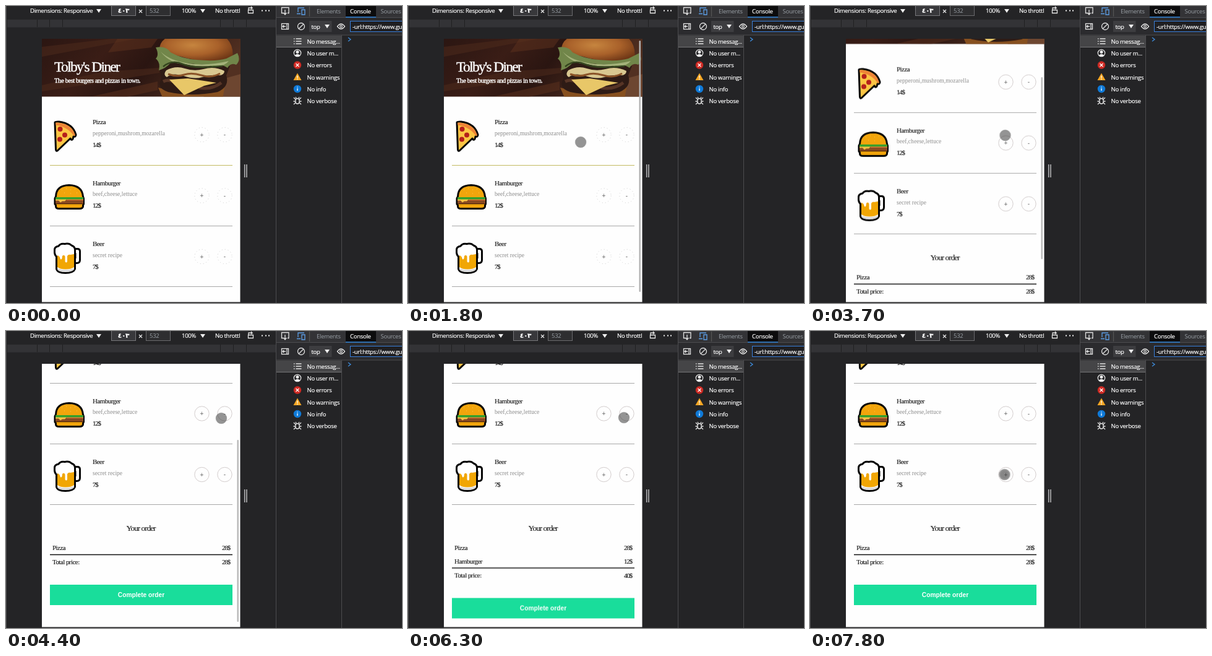
These frames come from a looping animation (640x480 px, 8 s). An HTML page:

```html
<!DOCTYPE html>
<html lang="en">
<head>
<meta charset="utf-8">
<title>Diner menu</title>
<style>
html, body { margin: 0; width: 100%; height: 100%; overflow: hidden; background: #242426; }
svg { display: block; width: 640px; height: 480px; }

.ui { font: 9.5px "Open Sans", "Noto Sans", sans-serif; letter-spacing: -.28px; }
.ui text { fill: #fff; stroke: #fff; stroke-width: .2; }
.ui .dim { fill: #9aa0a6; stroke: none; }
.line { fill: none; stroke: #e4e4e4; stroke-width: 1.3; }

.menu { font: 11px "Liberation Serif", "Noto Serif", serif; letter-spacing: -.55px; fill: #1c1c1c; stroke: #1c1c1c; stroke-width: .15; }
.menu .title { font-size: 23.5px; letter-spacing: -1.7px; stroke-width: .4; }
.menu .sub { letter-spacing: -.6px; stroke-width: .35; }
.white { fill: #fff; stroke: #fff; }
.menu .desc { font-size: 9.5px; letter-spacing: .03px; fill: #8c8c8c; stroke: none; }
.menu .price { letter-spacing: -1.2px; }
.menu .head { font-size: 13px; letter-spacing: -.9px; }
.end { text-anchor: end; }
.mid { text-anchor: middle; }
.rule { stroke: #a8a8a8; stroke-width: 1; }
.sign { font: 10px "Liberation Sans", Arial, sans-serif; letter-spacing: 0; fill: #666; stroke: none; text-anchor: middle; }
.cta { font: bold 10.2px "Liberation Sans", Arial, sans-serif; letter-spacing: 0; fill: #fff; stroke: none; text-anchor: middle; }
.ink { stroke: #050505; stroke-width: 3; stroke-linejoin: round; stroke-linecap: round; }

.page, .cursor, .thumb1, .thumb2 { animation: 8s linear infinite; }
.seen, .press, .extra, .plain, .lower, .rings, .first { animation: 8s step-end infinite; }

.page { animation-name: scroll; }
@keyframes scroll {
  0%, 3.75% { transform: translateY(0); }
  6.25%, 16.25% { transform: translateY(-8px); }
  20%, 45% { transform: translateY(0); animation-timing-function: ease-out; }
  48.75%, 100% { transform: translateY(-173px); }
}
.cursor { animation-name: move; }
@keyframes move {
  0%, 3.75% { transform: translate(214px, 300px); }
  7.5% { transform: translate(200px, 215px); }
  12.5%, 16.25% { transform: translate(196px, 207.5px); }
  20%, 21.25% { transform: translate(225px, 222px); }
  22.5% { transform: translate(279px, 220px); }
  27.5%, 36.25% { transform: translate(318px, 208px); }
  37.5%, 51.25% { transform: translate(315.5px, 209px); }
  55% { transform: translate(348px, 141px); }
  58.75%, 67.5% { transform: translate(317px, 133px); }
  76.25%, 88.75% { transform: translate(349px, 140px); }
  93.75%, 100% { transform: translate(314.5px, 232px); }
}
.seen { animation-name: seen; }
@keyframes seen { 0% { opacity: 0; } 3.75%, 100% { opacity: 1; } }
.press { animation-name: press; }
@keyframes press {
  0%, 37.5%, 45%, 62.5%, 83.75% { opacity: 0; }
  36.25%, 42.5%, 61.25%, 81.25%, 96.25%, 100% { opacity: 1; }
}
.thumb1 { animation-name: thumb1; }
@keyframes thumb1 {
  0%, 3.74% { opacity: 0; transform: translateY(0); }
  3.75% { opacity: 1; transform: translateY(0); }
  6.25%, 16.25% { opacity: 1; transform: translateY(8px); }
  20%, 25% { opacity: 1; transform: translateY(0); }
  27.5%, 100% { opacity: 0; transform: translateY(0); }
}
.thumb2 { animation-name: thumb2; }
@keyframes thumb2 {
  0%, 44.99% { opacity: 0; transform: translateY(0); }
  45% { opacity: 1; transform: translateY(0); animation-timing-function: ease-out; }
  48.75%, 56.25% { opacity: 1; transform: translateY(120px); }
  58.75%, 100% { opacity: 0; transform: translateY(120px); }
}
.extra { animation-name: extra; }
@keyframes extra { 0%, 86.25%, 100% { opacity: 0; } 65% { opacity: 1; } }
.plain { animation-name: plain; }
@keyframes plain { 0%, 86.25%, 100% { opacity: 1; } 65% { opacity: 0; } }
.lower { animation-name: lower; }
@keyframes lower { 0%, 86.25%, 100% { transform: translateY(0); } 65% { transform: translateY(21.5px); } }
.rings { fill: none; stroke-width: 1; animation-name: rings; }
@keyframes rings {
  0% { stroke: #c9c9c9; stroke-dasharray: 1 4; }
  45%, 100% { stroke: #d2cccc; stroke-dasharray: none; }
}
.first { animation-name: first; }
@keyframes first { 0% { stroke: #c3ba62; } 45%, 100% { stroke: #a8a8a8; } }
</style>
</head>
<body>
<svg viewBox="0 0 640 480">
  <defs>
    <clipPath id="view"><rect x="58" y="53" width="320.500" height="425.500"/></clipPath>
    <clipPath id="banner"><rect x="58" y="53" width="321" height="93.500"/></clipPath>
    <linearGradient id="wood" x2="1" y2=".25">
      <stop offset="0" stop-color="#2b1612"/><stop offset=".35" stop-color="#3a1d16"/>
      <stop offset=".6" stop-color="#2a1511"/><stop offset="1" stop-color="#523021"/>
    </linearGradient>
    <radialGradient id="bun" cx=".45" cy=".4" r=".65">
      <stop offset="0" stop-color="#c6853f"/><stop offset=".55" stop-color="#a9612a"/><stop offset="1" stop-color="#6f3716"/>
    </radialGradient>
    <path id="down" d="M0 0h8l-4 6z" fill="#eee"/>
  </defs>

  <!-- device toolbar -->
  <rect width="640" height="480" fill="#242426"/>
  <path d="M.5 0V480" stroke="#4a4a4c"/>
  <rect x="2" y="22" width="434" height="12.500" fill="#333336"/>
  <path d="M50.500 22v12M70.500 22v12M91.500 22v12M346.500 22v12M367.500 22v12M388.500 22v12" stroke="#1f1f21"/>
  <g class="ui">
    <text x="39" y="11">Dimensions: Responsive</text>
    <use href="#down" x="146" y="5"/>
    <rect x="170.500" y="-2" width="39" height="17.500" fill="#38383b" stroke="#77777a"/>
    <text class="mid" x="190" y="11" style="font:bold 10.5px 'DejaVu Sans',sans-serif">٤٠٣</text>
    <path d="M215 6l5 5m0-5l-5 5" class="line"/>
    <rect x="226.500" y="-2" width="39" height="17.500" fill="#2e2e30" stroke="#6a6a6d"/>
    <text class="dim" x="232" y="11">532</text>
    <text x="284" y="11">100%</text>
    <use href="#down" x="314" y="5"/>
    <text x="338" y="11">No throttl</text>
    <path d="M392 6V3h6l-2-2m2 2l-2 2M391.500 6.500h8v5h-8z" class="line"/>
    <path d="M413 7.500h2m4 0h2m3 0h2" stroke="#eee" stroke-width="2"/>
  </g>
  <path d="M385.700 256v21m3.300-21v21" stroke="#b4b4b6" stroke-width="1.600"/>

  <!-- phone page -->
  <g clip-path="url(#view)">
    <rect x="58" y="53" width="321" height="426" fill="#fefefe"/>
    <g class="page menu">
      <g clip-path="url(#banner)" stroke="none">
        <rect x="58" y="53" width="321" height="94" fill="url(#wood)"/>
        <path d="M58 66L170 53h40L58 82zM58 128l100-22 90-6v8l-110 18-80 12z" fill="#4d2a1c" opacity=".55"/>
        <path d="M140 146l105-24v14l-50 11zM180 53h65l-10 14-70 8z" fill="#5e331f" opacity=".5"/>
        <path d="M350 118l29-8v37h-60z" fill="#6d4630"/>
        <!-- burger -->
        <path d="M246 132Q300 146 354 128L350 150H254z" fill="#87501f"/>
        <path d="M249 95Q300 84 362 97L356 112Q362 130 342 139 300 147 262 139 242 132 251 118z" fill="#2e1b15"/>
        <path d="M254 122q10-5 20 2m38 8q20 4 36-8" fill="none" stroke="#573526" stroke-width="5"/>
        <path d="M259 104q15-8 30-3t30 1q18-5 34 3 0 8-12 7t-24 3-30-2-27 2q-7-4-1-11z" fill="#d9c891"/>
        <path d="M262 110q14 5 26 1t28 1 30-3" fill="none" stroke="#8b5428" stroke-width="3"/>
        <path d="M264 119l30-2 46 7-20 5-32 15z" fill="#e8c768"/>
        <path d="M248 72Q247 53 272 46h76q22 12 18 41Q322 94 280 81 258 79 248 72z" fill="url(#bun)"/>
        <path d="M242 67q17-3 24 8 18 10 42 12 32 3 48-2l18-9q6 12-2 19-9-4-14 5-11-8-22-1-14-7-26-4-14-4-24-1-14-7-20-2-8 9-19 12 3-13-5-19 6-6 0-18z" fill="#71864a"/>
        <path d="M250 74q16 15 46 19t64-4q-8 10-24 7-24 4-46-2-24 0-40-20z" fill="#a4b27a"/>
        <path d="M254 98q14-12 32-4t64 3" fill="none" stroke="#35451f" stroke-width="2.500"/>
      </g>
      <text class="title white" x="78" y="106">Tolby's Diner</text>
      <text class="sub white" x="78" y="123.500">The best burgers and pizzas in town.</text>

      <!-- pizza -->
      <path class="ink" d="M79 188Q80 186.500 86 187Q108 190 113 208Q113 212 109 211L108 215Q106 218 104 214L103 215L83 234Q81 235 80.500 232z" fill="#fcc544"/>
      <g stroke="none">
        <path d="M80 188.500Q106 189 112 209Q110 210 109 209Q99 195 80.500 192.500z" fill="#ee8436"/>
        <g fill="#b51f1b"><circle cx="87.500" cy="199" r="4"/><circle cx="95" cy="208.500" r="4"/><circle cx="87" cy="215.500" r="4"/></g>
      </g>
      <text x="140" y="191">Pizza</text>
      <text class="desc" x="140" y="209">pepperoni,mushrom,mozarella</text>
      <text class="price" x="140" y="228">14$</text>
      <path class="rule first" d="M71 257.500H366"/>

      <!-- hamburger -->
      <path class="ink" d="M80.500 308Q81 290 102 289.500Q123 290 124.500 308L125.500 311V320L124.500 322V324Q124 327.500 119 327.500H86Q80.500 327.500 80.500 324V322L79 320V311z" fill="#f2a50c"/>
      <g stroke="none">
        <path d="M80 309h45v4H80z" fill="#35a02c"/>
        <path d="M80 313h45v6H80z" fill="#8a4a22"/>
        <path d="M80 312.500h18l-3 3h-4l-3 2-3-3h-5z" fill="#f7c444"/>
        <path d="M98 312.500h27v1.500H98z" fill="#e07a35"/>
        <path d="M80 319h45v1.200H80z" fill="#4a220c"/>
        <path d="M90 297h1m6-2h1m6 2h1m6-1h1m-18 6h1m9 1h1m9-1h1" fill="none" stroke="#ffc84a" stroke-width="1"/>
      </g>
      <text x="140" y="289.500">Hamburger</text>
      <text class="desc" x="140" y="307">beef,cheese,lettuce</text>
      <text class="price" x="140" y="326">12$</text>
      <path class="rule" d="M71 355.500H366"/>

      <!-- beer -->
      <path class="ink" d="M110 392.500h5.500q4 0 4 4v14q0 5-5 5h-4.500" fill="#fff"/>
      <path class="ink" d="M81.500 405Q78 402 78.500 395Q78 389 85 388Q88 383 95 384.500Q102 383 106 387Q112 389 111.500 395V425Q109 431.500 96 431.500Q83 431.500 81.500 425z" fill="#fff"/>
      <path d="M110.500 401v7h3v-9z" fill="#050505" stroke="none"/>
      <path d="M83 403q4 1 4.500 5 1 3 3 0l.5-4q3-3 4.500 1v8q2 3 3.500 0v-9q2-3 5-2l6-1v21q-5 3.500-14 3.500-8 0-13-3.500z" fill="#f1a604" stroke="none"/>
      <path d="M83 424q13 5 27 0v2q-3 3.500-14 3.500T83 426z" fill="#d9d9d9" stroke="none"/>
      <text x="140" y="387.500">Beer</text>
      <text class="desc" x="140" y="405.500">secret recipe</text>
      <text class="price" x="140" y="424.500">7$</text>
      <path class="rule" d="M71 453.500H366"/>

      <g class="rings">
        <circle cx="316.500" cy="208" r="11.700"/><circle cx="353.500" cy="208" r="11.700"/>
        <circle cx="316.500" cy="306.500" r="11.700"/><circle cx="353.500" cy="306.500" r="11.700"/>
        <circle cx="316.500" cy="405" r="11.700"/><circle cx="353.500" cy="405" r="11.700"/>
      </g>
      <text class="sign" x="316.500" y="211.500">+</text><text class="sign" x="353.500" y="211">-</text>
      <text class="sign" x="316.500" y="310">+</text><text class="sign" x="353.500" y="309.500">-</text>
      <text class="sign" x="316.500" y="408.500">+</text><text class="sign" x="353.500" y="408">-</text>

      <!-- order -->
      <text class="head mid" x="218" y="496">Your order</text>
      <text x="75" y="527">Pizza</text><text class="price end" x="362" y="527">28$</text>
      <g class="extra">
        <text x="75" y="548.500">Hamburger</text><text class="price end" x="362" y="548.500">12$</text>
        <text class="price end" x="362" y="571.500">40$</text>
      </g>
      <text class="plain price end" x="362" y="550">28$</text>
      <g class="lower">
        <path d="M71 534.500H366" stroke="#111" stroke-width="1.500"/>
        <text x="75" y="550">Total price:</text>
        <rect x="71" y="583" width="295" height="33" fill="#19dd9b" stroke="none"/>
        <text class="cta" x="218.500" y="603">Complete order</text>
      </g>
    </g>
    <rect class="thumb1" x="373.500" y="56" width="2.500" height="406" rx="1" fill="#b4b4b4"/>
    <rect class="thumb2" x="373.500" y="56" width="2.500" height="294" rx="1" fill="#b9b9b9"/>
    <g class="cursor">
      <g class="seen">
        <circle r="8.800" fill="#3c3c3c" fill-opacity=".55" stroke="#777" stroke-opacity=".4"/>
        <circle class="press" r="6.800" fill="#333" fill-opacity=".15"/>
      </g>
    </g>
  </g>

  <!-- developer panel -->
  <rect x="436" width="204" height="480" fill="#242426"/>
  <rect x="437" width="203" height="18" fill="#333336"/>
  <rect x="437" y="18" width="203" height="29" fill="#2b2b2e"/>
  <rect x="437" y="48" width="105" height="19" fill="#454547"/>
  <path d="M437 66.500H542" stroke="#747476"/>
  <path d="M436.500 0V480M437 18.500H640M437 47H640M542.500 47V480" stroke="#4c4c4f"/>
  <rect x="549" width="49" height="18" fill="#0c0c0d"/>
  <path d="M549 18H598" stroke="#2f83d8" stroke-width="1.500"/>
  <g class="line">
    <path d="M449 11.500h-3.500v-9h11.500v9h-2M451 6v8m-2.500-3l2.500 3 2.500-3"/>
    <path d="M472 10V3h10M470 12.500h6M478 6h5v8h-5z" stroke="#5c9fe8"/>
    <path d="M490.500 1V17" stroke="#555"/>
    <rect x="445.500" y="28.500" width="11" height="9"/><path d="M454 28.500v9M452 33h-5m2-2l-2 2 2 2"/>
    <circle cx="477" cy="33" r="5.500"/><path d="M473 37l8-8"/>
    <path d="M535.500 33q6-8 12 0q-6 8-12 0z"/><circle cx="541.500" cy="33" r="1.800"/>
  </g>
  <g class="ui">
    <text class="dim" x="502" y="11.500">Elements</text>
    <text x="556" y="11.500">Console</text>
    <text class="dim" x="605.500" y="11.500">Sources</text>
    <rect x="490" y="24" width="36.500" height="18" fill="#3d3d40"/>
    <text x="493.500" y="37">top</text><use href="#down" x="515" y="30"/>
    <rect x="556.500" y="24.500" width="90" height="17" fill="#1f1f22" stroke="#3a80dc"/>
    <text x="560" y="37">-url:https://www.gu</text>
    <text x="486.500" y="61">No messag...</text>
    <text x="486.500" y="80">No user m...</text>
    <text x="486.500" y="99">No errors</text>
    <text x="486.500" y="118.500">No warnings</text>
    <text x="486.500" y="137.500">No info</text>
    <text x="486.500" y="157">No verbose</text>
  </g>
  <path d="M465 53h1.500m2 0h9M465 57h1.500m2 0h9M465 61h1.500m2 0h9" class="line"/>
  <circle cx="471" cy="76" r="5.700" class="line"/>
  <path d="M466.500 80q4.500-5 9 0-4.500 3-9 0z" fill="#eee"/><circle cx="471" cy="74.300" r="2.500" fill="#eee"/>
  <circle cx="471" cy="95.500" r="6.200" fill="#cf2b24"/><path d="M468.500 93l5 5m0-5l-5 5" stroke="#fff" stroke-width="1.300"/>
  <path d="M471 108.500l6.500 11.500h-13z" fill="#f5a623"/><path d="M471 112.500v4m0 1v1.500" stroke="#fff" stroke-width="1.300"/>
  <circle cx="471" cy="134" r="6.200" fill="#0f7ad8"/><path d="M471 133v4m0-6.500v1.300" stroke="#fff" stroke-width="1.300"/>
  <g class="line"><rect x="468" y="149.500" width="6" height="8.500" rx="3"/><path d="M468 151l-3-3m3 6h-3.500m3.500 2l-3 3m9-8l3-3m-3 6h3.500m-3.500 2l3 3M469 149l-1-2m5 2l1-2"/></g>
  <path d="M553 51l4 3-4 3" fill="none" stroke="#3e8fe0" stroke-width="1.300"/>
</svg>
</body>
</html>
```
